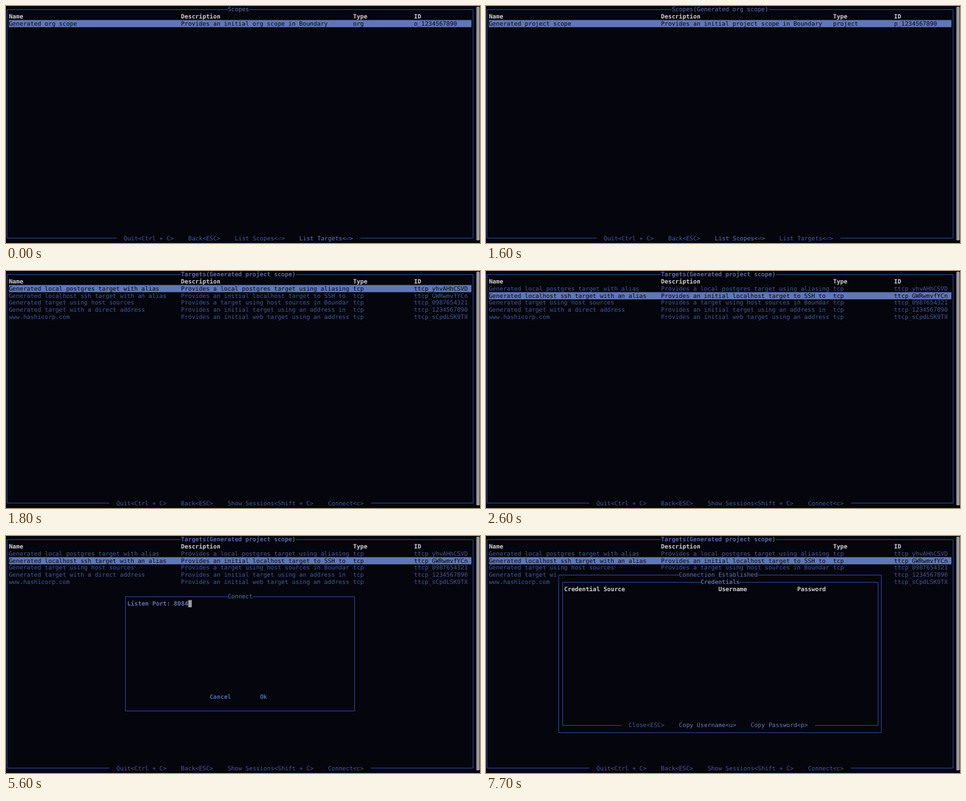
These frames come from a looping animation (720 px wide and 361 px high, 8 s). An HTML page:

```html
<!DOCTYPE html>
<html lang="en">
<head>
<meta charset="utf-8">
<title>Scope browser</title>
<style>
html, body { margin: 0; width: 100%; height: 100%; overflow: hidden; background: #05050d; }
svg { display: block; width: 100%; height: 100%; }
text {
  font: 9.046px "DejaVu Sans Mono", monospace;
  text-rendering: geometricPrecision;
  white-space: pre;
  fill: #465a98;
}
.head { font-weight: bold; fill: #d2d2d2; }
.title { fill: #6275b0; }
.strong { font-weight: bold; fill: #566aa6; }
.label { font-weight: bold; fill: #6275b0; }
.button { font-weight: bold; fill: #566aa6; }
.lit { fill: #6478b8; }
.dark { fill: #05050d; }
.bold { font-weight: bold; }
.bar { fill: #6077b6; }
.panel { fill: #05050d; }
.caret { fill: #9c9c9c; }
path { fill: none; stroke: #2a4494; stroke-width: 1; }

g[id] { visibility: hidden; animation: 8s step-end infinite; }
#orgs { animation-name: orgs; }
#projects { animation-name: projects; }
#targets { animation-name: targets; }
#first { animation-name: first; }
#second { animation-name: second; }
#connect { animation-name: connect; }
#zero { animation-name: zero; }
#four { animation-name: four; }
#caret { animation-name: caret; }
#cancel { animation-name: cancel; }
#ok { animation-name: ok; }
#done { animation-name: done; }
@keyframes orgs { 0% { visibility: visible } 6.25% { visibility: hidden } }
@keyframes projects { 6.25% { visibility: visible } 21.25% { visibility: hidden } }
@keyframes targets { 21.25% { visibility: visible } }
@keyframes first { 21.25% { visibility: visible } 32.5% { visibility: hidden } }
@keyframes second { 32.5% { visibility: visible } }
@keyframes connect { 45% { visibility: visible } 95% { visibility: hidden } }
@keyframes zero { 45% { visibility: visible } 67.5% { visibility: hidden } }
@keyframes four { 68.75% { visibility: visible } 95% { visibility: hidden } }
@keyframes caret {
  0% { transform: none }
  45% { visibility: visible; transform: none }
  52.5% { visibility: hidden; transform: none }
  60% { visibility: visible; transform: none }
  67.5% { visibility: visible; transform: translateX(-5.446px) }
  68.75% { visibility: visible; transform: none }
  77.5% { visibility: hidden; transform: none }
}
@keyframes cancel { 78.75% { visibility: visible } 87.5% { visibility: hidden } }
@keyframes ok { 87.5% { visibility: visible } 95% { visibility: hidden } }
@keyframes done { 95% { visibility: visible } }
</style>
</head>
<body>
<svg viewBox="0 0 720 361" preserveAspectRatio="none"></svg>
<script>
const NS = 'http://www.w3.org/2000/svg';
const CELL = 5.446, LINE = 10.9;
const svg = document.querySelector('svg');
let layer = svg;

const left = col => col * CELL - 1;
const mid = col => Math.round(left(col) + CELL / 2 - .5) + .5;
const row = r => 5 + r * LINE;
const rule = r => Math.round(row(r) - .5) + .5;

function add(tag, attrs, parent = layer) {
  const el = document.createElementNS(NS, tag);
  for (const key in attrs) el.setAttribute(key, attrs[key]);
  return parent.appendChild(el);
}
function group(id, draw) {
  layer = add('g', { id }, svg);
  draw();
  layer = svg;
}
function text(col, r, str, cls = '') {
  add('text', { x: left(col), y: row(r) + 2.8, class: cls }).textContent = str;
}
function fill(from, to, top, bottom, cls) {
  add('rect', {
    x: left(from), y: row(top) - LINE / 2,
    width: (to - from) * CELL, height: (bottom - top + 1) * LINE, class: cls
  });
}

// Horizontal border with a gap between two columns
function edge(c0, c1, r, gap = [c1, c1]) {
  const y = rule(r);
  add('path', { d: `M${mid(c0)} ${y}H${left(gap[0])}M${left(gap[1])} ${y}H${mid(c1)}` });
}
function sides(c0, c1, r0, r1) {
  add('path', { d: `M${mid(c0)} ${rule(r0)}V${rule(r1)}M${mid(c1)} ${rule(r0)}V${rule(r1)}` });
}
function titled(c0, c1, r, col, str, cls) {
  edge(c0, c1, r, [col, col + str.length]);
  text(col, r, str, cls);
}
function cells(r, values, cls) {
  [1, 49, 97, 114].forEach((col, i) => text(col, r, values[i], cls));
}
function selected(r, values) {
  fill(1, 130, r, r, 'bar');
  cells(r, values, 'dark');
}
function scopeFooter(litIndex) {
  edge(0, 130, 32, [31, 99]);
  text(33, 32, 'Quit<Ctrl + C>');
  text(51, 32, 'Back<ESC>');
  text(64, 32, 'List Scopes<⏎>', litIndex === 0 ? 'lit' : '');
  text(82, 32, 'List Targets<⏎>', litIndex === 1 ? 'lit' : '');
}

const hosts = [
  ['Generated local postgres target with alias', 'Provides a local postgres target using aliasing', 'tcp', 'ttcp_yhvAHhCSVD'],
  ['Generated localhost ssh target with an alias', 'Provides an initial localhost target to SSH to', 'tcp', 'ttcp_GWRwmvfYCn'],
  ['Generated target using host sources', 'Provides a target using host sources in Boundar', 'tcp', 'ttcp_0987654321'],
  ['Generated target with a direct address', 'Provides an initial target using an address in', 'tcp', 'ttcp_1234567890'],
  ['www.hashicorp.com', 'Provides an initial web target using an address', 'tcp', 'ttcp_sCpdLSK9TX']
];

// Window frame and scrollbar
sides(0, 130, 0, 32);
cells(1, ['Name', 'Description', 'Type', 'ID'], 'head');
add('rect', { x: 714.5, y: 1, width: 5, height: 356, rx: 1.5, class: 'caret' });

group('orgs', () => {
  titled(0, 130, 0, 62, 'Scopes', 'title');
  selected(2, ['Generated org scope', 'Provides an initial org scope in Boundary', 'org', 'o_1234567890']);
  scopeFooter(1);
});

group('projects', () => {
  titled(0, 130, 0, 52, 'Scopes(Generated org scope)', 'title');
  selected(2, ['Generated project scope', 'Provides an initial project scope in Boundary', 'project', 'p_1234567890']);
  scopeFooter(0);
});

group('targets', () => {
  titled(0, 130, 0, 49, 'Targets(Generated project scope)', 'strong');
  hosts.forEach((host, i) => cells(i + 2, host));
  edge(0, 130, 32, [29, 102]);
  text(31, 32, 'Quit<Ctrl + C>');
  text(49, 32, 'Back<ESC>');
  text(62, 32, 'Show Sessions<Shift + C>');
  text(90, 32, 'Connect<c>');
});
group('first', () => selected(2, hosts[0]));
group('second', () => selected(3, hosts[1]));

group('connect', () => {
  fill(33, 98, 8, 24, 'panel');
  sides(33, 97, 8, 24);
  titled(33, 97, 8, 62, 'Connect', 'title');
  edge(33, 97, 24);
  text(34, 9, 'Listen Port: 808', 'label');
  text(57, 22, 'Cancel', 'button');
  text(71, 22, 'Ok', 'button');
});
group('zero', () => text(50, 9, '0', 'label'));
group('four', () => text(50, 9, '4', 'label'));
group('caret', () => fill(51, 52, 9, 9, 'caret'));
group('cancel', () => {
  fill(53, 67, 22, 22, 'bar');
  text(57, 22, 'Cancel', 'dark bold');
});
group('ok', () => {
  fill(67, 77, 22, 22, 'bar');
  text(71, 22, 'Ok', 'dark bold');
});

group('done', () => {
  fill(20, 111, 5, 27, 'panel');
  sides(20, 110, 5, 27);
  titled(20, 110, 5, 54, 'Connection Established', 'title');
  edge(20, 110, 27);
  sides(21, 109, 6, 26);
  titled(21, 109, 6, 60, 'Credentials', 'strong');
  text(22, 7, 'Credential Source', 'head');
  text(65, 7, 'Username', 'head');
  text(87, 7, 'Password', 'head');
  edge(21, 109, 26, [38, 92]);
  text(40, 26, 'Close<ESC>');
  text(54, 26, 'Copy Username<u>', 'lit');
  text(74, 26, 'Copy Password<p>', 'lit');
});
</script>
</body>
</html>
```
